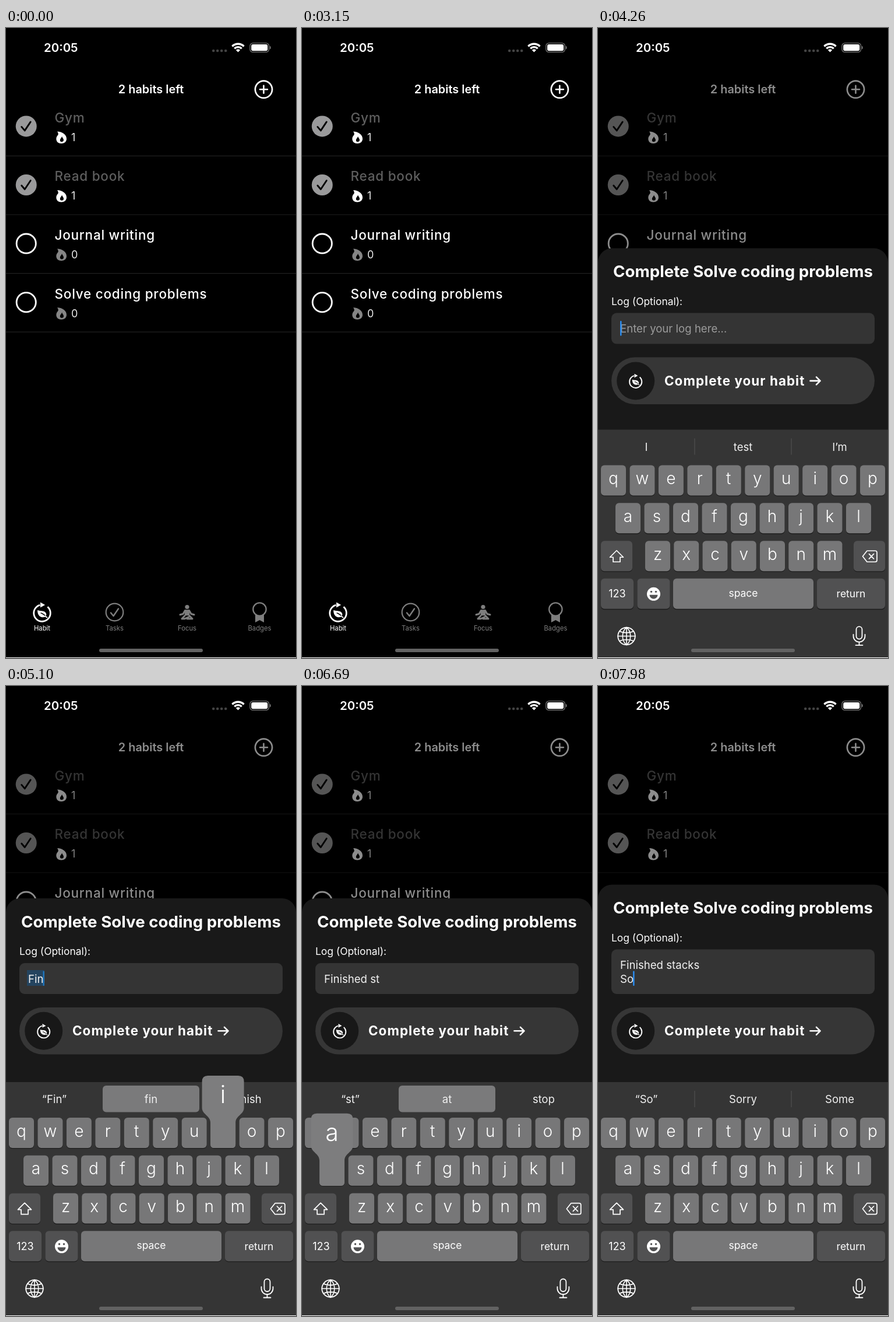
These frames come from a looping animation (498x1080 px, 8000 ms). An HTML page with a canvas:

```html
<!DOCTYPE html>
<html lang="en">
<head>
<meta charset="utf-8">
<title>Habit log</title>
<style>
html, body { margin: 0; width: 100%; height: 100%; overflow: hidden; background: #000; }
canvas { display: block; }
</style>
</head>
<body>
<canvas id="stage" width="498" height="1080"></canvas>
<script>
const c = document.getElementById('stage').getContext('2d');
const LOOP = 8000, HOLD = 100, KB_HEIGHT = 401, SHEET_HEIGHT = 315;
const SHEET_AT = 3170, KB_AT = 4060;

// Touch-down times; the letter is entered on release
const taps = [
  [4400, 'shift'], [4620, 'F'], [4780, 'i'], [4920, 'n'], [5070, 'i'],
  [5330, 's'], [5560, 'h'], [5850, 'Finished '], [6140, 's'], [6380, 't'],
  [6640, 'a'], [6800, 'c'], [6930, 'k'], [7050, 's'], [7170, '\n'],
  [7420, 'shift'], [7600, 'S'], [7780, 'o']
];
// Suggestions for the current word; * marks the automatic correction
const hints = {
  '': 'I|test|I’m', F: '“F”|For|First', Fi: '“Fi”|First|Find', Fin: '“Fin”|*fin|finish',
  Fini: '“Fini”|*finish|finished', Finis: '“Finis”|*finish|finished',
  Finish: '“Finish”|Finished|Finishing', s: '“s”|so|some', st: '“st”|*at|stop',
  sta: '“sta”|start|stay', stac: '“stac”|*stack|stacks', stack: '“stack”|stacks|stacked',
  stacks: '“stacks”|stacked|stack', S: '“S”|So|She', So: '“So”|Sorry|Some'
};

const clamp = x => Math.max(0, Math.min(1, x));
const easeOut = (x, p) => 1 - (1 - clamp(x)) ** p;
const spring = ms => { const x = Math.max(0, ms) * 0.028; return 1 - (1 + x) * Math.exp(-x); };

function box(x, y, w, h, r, fill) {
  c.beginPath();
  c.roundRect(x, y, w, h, r);
  c.fillStyle = fill;
  c.fill();
}

function text(s, x, y, size, weight, color, align = 'left', spacing = 0) {
  c.font = `${weight} ${size}px Inter, "Liberation Sans", sans-serif`;
  c.letterSpacing = spacing + 'px';
  c.textAlign = align;
  c.fillStyle = color;
  c.fillText(s, x, y);
}

function icon(x, y, d, { fill, stroke, lw = 2, scale = 1 }) {
  const p = new Path2D(d);
  c.save();
  c.translate(x, y);
  c.scale(scale, scale);
  c.lineWidth = lw;
  c.lineCap = c.lineJoin = 'round';
  if (fill) { c.fillStyle = fill; c.fill(p, 'evenodd'); }
  if (stroke) { c.strokeStyle = stroke; c.stroke(p); }
  c.restore();
}

function ring(x, y, r, color, lw, from = 0, to = 2 * Math.PI) {
  c.beginPath();
  c.arc(x, y, r, from, to);
  c.lineWidth = lw;
  c.lineCap = 'butt';
  c.strokeStyle = color;
  c.stroke();
}

function disc(x, y, r, fill) { box(x - r, y - r, 2 * r, 2 * r, r, fill); }

function habitIcon(x, y, scale, lw) {
  ring(x, y, 14.3 * scale, '#fff', lw, -0.85, 4.45);
  icon(x, y, 'M-3-18.5L5-14L-3-9.5Z', { fill: '#fff', scale });
  icon(x, y, 'M-8-5C-3-3 5-5 7 1C8 4 6 7 3 7C-4 8-8 3-8-5Z', { fill: '#fff', scale });
  icon(x, y, 'M-2 0C2 1 5 4 8 7', { stroke: '#000', lw: 1.4, scale });
  icon(x, y, 'M5 5L8.5 7.5', { stroke: '#fff', lw: 1.6, scale });
}

function statusBar() {
  text('20:05', 65, 41, 20.4, 600, '#fff');
  for (let i = 0; i < 4; i++) disc(356.2 + 7 * i, 39, 2.3, '#444');
  const a = -Math.PI * 0.75, b = -Math.PI * 0.25;
  ring(398.5, 41.5, 14.2, '#fff', 3.4, a, b);
  ring(398.5, 41.5, 8.8, '#fff', 3.3, a, b);
  ring(398.5, 41.5, 2.6, '#fff', 5.2, a, b);
  c.beginPath();
  c.roundRect(419, 25.8, 32.5, 15.6, 5);
  c.lineWidth = 1.3;
  c.strokeStyle = '#777';
  c.stroke();
  box(421.2, 28, 28.1, 11.2, 3, '#fff');
  box(453, 31, 1.8, 5.4, [0, 2, 2, 0], '#777');
}

function habitRow(i, name, done) {
  const y = 168.4 + 100.6 * i;
  if (done) {
    disc(34.7, y, 18, '#9a9a9b');
    icon(34.7, y, 'M-8 1L-2.5 7.5L7.5-7.5', { stroke: '#000', lw: 2.8 });
  } else ring(34.7, y, 16.6, '#fff', 2.8);
  text(name, 83.5, y - 6.7, 22.5, 500, done ? '#5e5e5e' : '#fff', 'left', 0.76);
  icon(95, y + 19,
    'M-7-10C2-9.5 9-5 9 2.5C9 7.5 5 10.5 0 10.5C-5 10.5-8.7 7.5-8.7 2.5C-8.7-1-7-2.5-5.5-4.5C-4.8-6-5.5-8-7-10Z' +
    'M1-2C1 .5-2.2 2-2.2 5C-2.2 6.8-1 7.8 .7 7.8C2.8 7.8 4 6.5 4 4.7C4 2.5 1.7 .7 1-2Z',
    { fill: done ? '#fff' : '#858585' });
  text(done ? '1' : '0', 112, y + 25.3, 18, 400, '#ececec');
  box(0, y + 50.4, 498, 1.2, 0, '#202020');
}

function habitList() {
  text('2 habits left', 249, 112, 19.9, 600, '#fff', 'center');
  ring(442.5, 105.3, 14.6, '#fff', 2.7);
  icon(442.5, 105.3, 'M-6.5 0H6.5M0-6.5V6.5', { stroke: '#fff', lw: 2.6 });
  ['Gym', 'Read book', 'Journal writing', 'Solve coding problems']
    .forEach((name, i) => habitRow(i, name, i < 2));

  const grey = '#7e7e7e';
  habitIcon(62, 1003, 1, 2.8);
  ring(186.5, 1001.5, 14.8, grey, 2.2);
  icon(186.5, 1001.5, 'M-6.5 1L-2 6.5L6.5-6', { stroke: grey, lw: 2.4 });
  disc(311, 992.5, 3.6, grey);
  icon(311, 1003, 'M-3-4.5H3V3H-3Z', { fill: grey, stroke: grey, lw: 2.5 });
  icon(311, 1003, 'M-3.5-4.5L-7 1.5L-12 2.8M3.5-4.5L7 1.5L12 2.8M-4 4.5L-9 9.8H-4.5L3 6.5M4 4.5L9 9.8H0', { stroke: grey, lw: 3 });
  ring(435.5, 996.5, 11.2, grey, 2.3);
  icon(435.5, 1005, 'M-7.5 0C-4 3 4 3 7.5 0V14L0 10L-7.5 14Z', { fill: grey });
  ['Habit', 'Tasks', 'Focus', 'Badges'].forEach((s, i) =>
    text(s, 62 + 124.5 * i, 1032.5, 11.3, 400, i ? grey : '#fff', 'center'));
}

function sheet(bottom, grow, typed, t) {
  const y = bottom - SHEET_HEIGHT - grow;
  box(0, y, 498, 1200, 24, '#191919');
  text('Complete Solve coding problems', 249, y + 49.8, 27.7, 700, '#fff', 'center');
  text('Log (Optional):', 23, y + 97, 17.4, 400, '#fff');
  box(23, y + 111, 452, 53 + grow, 9, '#343434');

  const lines = typed.split('\n'), last = lines[lines.length - 1];
  const base = y + 144.5;
  c.font = '400 18.6px Inter, "Liberation Sans", sans-serif';
  c.letterSpacing = '0px';
  const caretX = 38 + c.measureText(last).width;
  const marked = /^Fin(i|is|ish)?$/.test(typed);
  if (marked) box(36, base - 21.5, caretX - 35, 27, 0, '#24445f');
  if (!typed) text('Enter your log here...', 38, base, 18.6, 400, '#9c9c9c');
  lines.forEach((s, i) => text(s, 38, base + 23.5 * i, 18.6, 400, '#f2f2f2'));
  if (t > KB_AT && (t - 3900) % 1000 < 500)
    box(caretX - (typed ? 1 : 0), base - 20 + 23.5 * (lines.length - 1), 2.5, 25.5, 1.2, marked ? '#2176bd' : '#2b8df0');

  const by = bottom - 128;
  box(23, by, 452, 80.5, 40.25, '#363636');
  disc(64.7, by + 40.3, 32.5, '#181818');
  habitIcon(64.7, by + 41.8, 0.74, 1.9);
  text('Complete your habit', 114, by + 48, 22.4, 700, '#fff', 'left', 1.06);
  icon(373, by + 40.3, 'M-8.5 0H8.5M2-6.5L8.5 0L2 6.5', { stroke: '#fff', lw: 2.6 });
}

function keyBox(x, y, w, fill) {
  box(x, y + 1.3, w, 52, 6, '#1d1d1d');
  box(x, y, w, 52, 6, fill);
}

function popup(x, y, letter) {
  icon(x, y, 'M-26-72H26Q36-72 36-62V-17C36-5 21.5-4 21.5 9V46Q21.5 52 15.5 52H-15.5Q-21.5 52-21.5 46V9C-21.5-4-36-5-36-17V-62Q-36-72-26-72Z', { fill: '#7d7d7e' });
  text(letter, x, y - 25, 41, 300, '#fff', 'center');
}

function hintBar(top, typed, pressed) {
  const word = typed.split(/\s/).pop();
  const items = hints[word].split('|');
  const picked = items.findIndex(s => s[0] === '*' || s + ' ' === pressed);
  if (picked >= 0) box(166 * picked, top + 6, 166, 45.5, 6, '#7a7a7b');
  else [165.5, 331.5].forEach(x => box(x, top + 15, 1, 28, 0, '#565656'));
  items.forEach((s, i) => text(s.replace('*', ''), 83 + 166 * i, top + 36, 18.5, 400, '#f0f0f0', 'center'));
}

function keyboard(top, typed, pressed, shifted) {
  const light = '#777778', dark = '#515152', white = '#fff';
  box(0, top, 498, 600, 0, '#353535');
  hintBar(top, typed, pressed);

  let held = null;
  [['qwertyuiop', 5, 49.45], ['asdfghjkl', 30, 49.5], ['zxcvbnm', 81, 49.25]].forEach(([row, x0, step], r) => {
    [...row].forEach((k, i) => {
      const x = x0 + step * i, y = top + 61 + 64.8 * r;
      const label = shifted ? k.toUpperCase() : k;
      keyBox(x, y, 43, light);
      if (pressed === label) held = [x + 21.5, y, label];
      else text(label, x + 21.5, y + 32.5, 28, 300, white, 'center');
    });
  });

  const y3 = top + 190.7, y4 = top + 255.3;
  keyBox(5, y3, 54, shifted ? '#e4e4e4' : dark);
  icon(32, y3 + 26.5, 'M0-10L11.5 1.5H6V9.5H-6V1.5H-11.5Z',
    shifted ? { fill: '#000', stroke: '#000', lw: 1.7 } : { stroke: white, lw: 1.7 });
  keyBox(439, y3, 54, dark);
  icon(467, y3 + 26.5, 'M-5-9.5H9Q12-9.5 12-6.5V6.5Q12 9.5 9 9.5H-5L-12.5 0ZM-1.5-4.2L6.5 4.2M6.5-4.2L-1.5 4.2', { stroke: white, lw: 1.7 });

  keyBox(5, y4, 56, dark);
  text('123', 33, y4 + 32.5, 18, 400, white, 'center');
  keyBox(67.5, y4, 56, dark);
  disc(95.5, y4 + 26.5, 11.5, white);
  disc(91.5, y4 + 22.5, 1.7, dark);
  disc(99.5, y4 + 22.5, 1.7, dark);
  icon(95.5, y4 + 28, 'M-7 0H7C6.5 9-6.5 9-7 0Z', { fill: dark });
  keyBox(129, y4, 241, light);
  text('space', 249.5, y4 + 31, 17.5, 400, white, 'center');
  keyBox(376, y4, 117, pressed === '\n' ? light : dark);
  text('return', 434.5, y4 + 32.5, 17.5, 400, white, 'center');

  const y5 = top + 354;
  ring(49, y5, 14.8, white, 1.8);
  icon(49, y5, 'M0-15V15M-15 0H15M0-15C-9-8-9 8 0 15C9 8 9-8 0-15M-12-8.5C-6-5 6-5 12-8.5M-12 8.5C-6 5 6 5 12 8.5', { stroke: white, lw: 1.6 });
  icon(448.5, y5, 'M-5-11.5A5 5 0 0 1 5-11.5V0A5 5 0 0 1-5 0ZM-10-3V0A10 10 0 0 0 10 0V-3M0 10V15.5M-6 15.5H6', { stroke: white, lw: 1.8 });

  if (held) popup(...held);
}

function typing(t) {
  let typed = '', pressed = null, shifted = false, returnAt = Infinity;
  for (const [at, key] of taps) {
    if (t < at) break;
    if (key === 'shift') { shifted = true; continue; }
    if (t < at + HOLD) { pressed = key; break; }
    typed = key.length > 1 ? typed.replace(/\S*$/, key) : typed + key;
    shifted = false;
    if (key === '\n') returnAt = at + HOLD;
  }
  return { typed, pressed, shifted, returnAt };
}

function draw(t) {
  box(0, 0, 498, 1080, 0, '#000');
  habitList();
  const open = easeOut((t - SHEET_AT) / 220, 2.3);
  if (open > 0) {
    box(0, 0, 498, 1080, 0, `rgba(0,0,0,${0.45 * open})`);
    const { typed, pressed, shifted, returnAt } = typing(t);
    const bottom = 1080 + SHEET_HEIGHT * (1 - open) - KB_HEIGHT * spring(t - KB_AT - 15);
    sheet(bottom, 23.5 * easeOut((t - returnAt) / 180, 2), typed, t);
    if (t > KB_AT) keyboard(1080 - KB_HEIGHT * spring(t - KB_AT), typed, pressed, shifted);
  }
  statusBar();
  box(160, 1064, 178, 6, 3, '#626262');
  box(0, 1079, 498, 1, 0, '#fff'); // light bottom edge of the stage
}

function frame() {
  draw(performance.now() % LOOP);
  requestAnimationFrame(frame);
}
frame();
</script>
</body>
</html>
```
